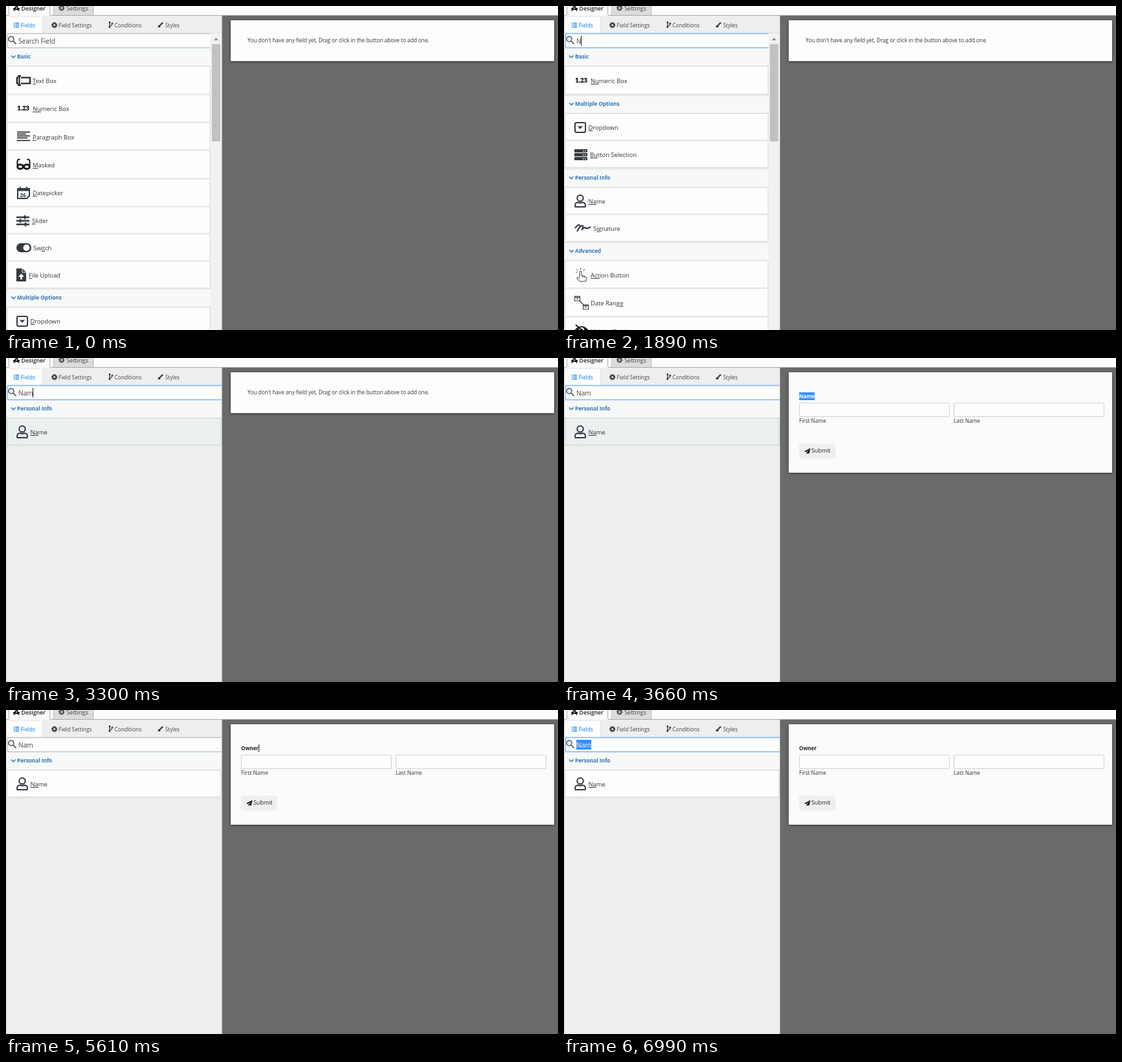
Animation of 850x500 px, one loop 8000 ms. Source, as an HTML page:

```html
<!DOCTYPE html>
<html lang="en">
<head>
<meta charset="utf-8">
<title>Form designer</title>
<style>
  html, body { margin: 0; width: 100%; height: 100%; overflow: hidden; background: #6a6a6a; }
  svg { display: block; width: 850px; height: 500px; }
  text { font-family: "Open Sans", "Noto Sans", sans-serif; white-space: pre; }
  .u { text-decoration: underline; }
  .line { fill: none; stroke: #343a40; stroke-width: 2; }
  .ink { fill: none; stroke: #111; stroke-width: 2; }
  .card { filter: drop-shadow(0 1px 2px rgba(0, 0, 0, .5)); }
</style>
</head>
<body>
<svg id="stage" viewBox="0 0 850 500"></svg>
<script>
const LOOP = 8000;
const WHITE = '#fdfdfd', BLUE = '#2f74b5', DARK = '#343a40';

const rect = (x, y, w, h, fill, more = '') =>
  `<rect x="${x}" y="${y}" width="${w}" height="${h}" fill="${fill}" ${more}/>`;
const path = (d, more = 'class="line"') => `<path d="${d}" ${more}/>`;
const circle = (x, y, r, more) => `<circle cx="${x}" cy="${y}" r="${r}" ${more}/>`;
// Letters between underscores are underlined.
const text = (x, y, size, fill, str, more = '') =>
  `<text x="${x}" y="${y}" font-size="${size}" fill="${fill}" ${more}>` +
  str.replace(/_(.+?)_/g, '<tspan class="u">$1</tspan>') + '</text>';
const group = (id, body, more = '') => `<g id="${id}" ${more}>${body}</g>`;
const gear = (x, y, color) =>
  circle(x, y, 2.6, `fill="none" stroke="${color}" stroke-width="2.2"`) +
  circle(x, y, 4, `fill="none" stroke="${color}" stroke-width="1.5" stroke-dasharray="1.7 1.44"`);

// Icons are drawn from the left edge of the icon and the label's baseline.
const icons = {
  textBox: path('M4.5-11V3M2-11h5M2 3h5M3-8.5H1v9h2M7-8.5h14v9H7', 'class="ink"'),
  number: text(1.5, -1, 9.3, '#111', '1.23',
    'font-weight="800" stroke="#111" stroke-width=".4" style="font-family:\'Noto Serif\',serif"'),
  paragraph: path('M1-11.5h20M1-8.5h14M1-5.5h20M1-2.5h16M1 1.5h20', 'class="ink" style="stroke-width:1.5"'),
  mask: path('M1.5-3V-9q0-4 4-3M20.500-3V-9q0-4-4-3M9-3h4', 'class="ink"') +
    [6, 16].map(x => `<ellipse cx="${x}" cy="-1" rx="4.3" ry="3.3" class="ink" style="stroke-width:2.8"/>`).join(''),
  calendar: path('M2-10h18V1l-4 4H2z') + rect(1, -11, 20, 4.500, DARK) + path('M6-13v3M16-13v3') +
    text(5.500, 3, 8, DARK, '26', 'font-weight="700"'),
  slider: path('M0-9h20M0-3.500h20M0 2h20M13-12v6M6-6.500v6M14-1v6', 'class="line" style="stroke-width:2.4"'),
  toggle: rect(0, -11, 23, 14, DARK, 'rx="7"') + circle(15.500, -4, 5, `fill="${WHITE}"`),
  upload: path('M0-14h9l6 6V6H0z', `fill="${DARK}"`) +
    path('M9-14v6h6', `fill="none" stroke="${WHITE}"`) +
    path('M7.500-6l4.500 5h-3v4h-3v-4h-3z', `fill="${WHITE}"`),
  dropdown: rect(1, -11, 16, 15, 'none', 'rx="2" class="line"') + path('M5-5.500h8l-4 4.500z', `fill="${DARK}"`),
  bars: [-12, -6, 0].map(y => rect(0, y, 20, 5, DARK, 'rx="1"') +
    rect(13, y + 2, 1.500, 1.500, WHITE) + rect(16, y + 2, 1.500, 1.500, WHITE)).join(''),
  person: circle(9, -8.500, 4.700, 'class="line"') +
    path('M1 4V3q0-5 5-5q3 1.500 6 0q5 0 5 5v1q0 1-1 1H2q-1 0-1-1z'),
  scribble: path('M1-4Q5-10 8-9Q10-7 4 1Q9-9 13-8Q14-6 11-1Q15-6 17-5Q17-2 25-6'),
  hand: path('M8 0V-8q0-2 1.500-2t1.500 2v5l6 1.500q2 .5 1.500 3l-1 4.500H9L4 2Q4-1 6 0l2 2' +
    'M13-3v3M16-2v2M9.500-12v-3M5-11l-2-2M14-11l2-2M4-8H2', 'class="line" style="stroke-width:1"'),
  range: [[.5, -14], [13.500, -1]].map(([x, y]) => rect(x, y, 8, 7, 'none', 'class="line" style="stroke-width:1"') +
    path(`M${x} ${y + 1.500}h8M${x + 3} ${y + 4}h2`, 'class="line" style="stroke-width:1.500"')).join('') +
    path('M8-7L14-1', 'class="line" style="stroke-width:1.2"'),
  hidden: path('M0-6Q11-18 22-6Q11 6 0-6z', 'fill="#222"') + circle(11, -6, 4, `fill="${WHITE}"`) +
    circle(11, -6, 2, 'fill="#222"') + path('M2-14L20 2', 'class="ink"')
};

// [label, icon, label x, row height]
const fields = {
  textBox: ['_T_ext Box', 'textBox', 41, 43.5],
  numeric: ['_Nu_meric Box', 'number', 41, 43.5],
  paragraph: ['_P_aragraph Box', 'paragraph', 41, 43],
  masked: ['_M_asked', 'mask', 41, 43.5],
  date: ['_D_atepicker', 'calendar', 41, 43],
  slider: ['_S_lider', 'slider', 40, 42],
  toggle: ['Sw_it_ch', 'toggle', 42, 42],
  upload: ['_F_ile Upload', 'upload', 35, 42],
  dropdown: ['_D_ropdown', 'dropdown', 37.5, 42],
  buttons: ['_Bu_tton Selection', 'bars', 40, 42],
  name: ['_Na_me', 'person', 37.5, 42],
  signature: ['S_i_gnature', 'scribble', 45, 42],
  action: ['_Act_ion Button', 'hand', 41, 43],
  range: ['Date Rang_e_', 'range', 41, 44],
  hidden: ['_Hi_dden Field', 'hidden', 41, 43]
};

function header(y, title, width, id = '') {
  return rect(1, y, width, 26, '#f7f8f8') +
    path(`M1 ${y + 26}.5h${width}`, 'stroke="#d9dcde"') +
    path(`M8 ${y + 10.5}l3.300 3.300l3.300-3.300`, `fill="none" stroke="${BLUE}" stroke-width="1.500"`) +
    text(17, y + 15, 8.2, BLUE, title, `font-weight="700" ${id}`);
}

function row(y, [label, icon, x, height], width, id = '') {
  const top = Math.round(y), base = Math.round(y + height / 2 + 4);
  const h = Math.round(y + height) - top - 1;
  return rect(2.5, top + .5, width - 3, h - 1, WHITE, `stroke="#eceeef" ${id}`) +
    `<g transform="translate(16 ${base})">${icons[icon]}</g>` +
    text(x, base, 9.4, '#333', label);
}

function list(sections, width, named = false) {
  let y = 66, out = '';
  for (const [title, keys] of sections) {
    const height = 27 + keys.reduce((sum, k) => sum + fields[k][3], 0);
    out += rect(1, Math.round(y), width, Math.round(height + 1), '#e2e3e4');
    out += header(Math.round(y), title, width, named ? 'id="heading"' : '');
    y += 27;
    for (const key of keys) {
      out += row(y, fields[key], width, named ? 'id="nameRow"' : '');
      y += fields[key][3];
    }
    y += 2.5;
  }
  return out;
}

const lists = {
  all: list([['Basic', ['textBox', 'numeric', 'paragraph', 'masked', 'date', 'slider', 'toggle', 'upload']],
    ['Multiple Options', ['dropdown']]], 314),
  n: list([['Basic', ['numeric']], ['Multiple Options', ['dropdown', 'buttons']],
    ['Personal Info', ['name', 'signature']], ['Advanced', ['action', 'range', 'hidden']]], 314),
  na: list([['Personal Info', ['name', 'signature']]], 331),
  nam: list([['Personal Info', ['name']]], 331, true)
};

const topBar = rect(0, 0, 850, 14, WHITE) + rect(0, 14, 850, 1, '#a9a9a9') +
  rect(73, 0, 62, 14, '#dcdcdc') + path('M73.5 0V14M134.5 0V14', 'stroke="#bbb"') +
  rect(4, 0, 64, 15, WHITE) + path('M4.5 0V14M67.5 0V14', 'stroke="#aaa"') +
  path('M15.500 0L12 7.500M16.500 0L20 7.500M11 3.500q5 3 10 0', 'class="ink" style="stroke-width:1.800"') +
  text(23.5, 7, 8.75, '#222', 'Designer', 'font-weight="600"') +
  gear(85.5, 3, '#555') + text(93, 7, 9.15, '#444', 'Settings');

const tabs = rect(0, 15, 333, 485, '#eee') + rect(0, 15, 1, 485, '#d2d6da') +
  rect(1, 17, 55, 25, WHITE) + path('M56.5 17V42', 'stroke="#ddd"') +
  path('M12 26.500h1.600M12 29.500h1.600M12 32.500h1.600M14.500 26.500h5.500M14.500 29.500h5.500M14.500 32.500h5.500',
    'stroke="#0d7ff5" stroke-width="1.400"') +
  text(22.5, 33, 8.3, '#0d7ff5', 'Fields') +
  gear(74.5, 29.5, '#444') + text(81, 33, 8.3, '#444', 'Field Settings') +
  path('M159.500 26V33M163.500 27.500q0 3-4 3', 'fill="none" stroke="#333" stroke-width="1.200"') +
  [[159.5, 25.5], [159.5, 32.5], [163.5, 27]].map(([x, y]) => circle(x, y, 1.4, 'fill="#333"')).join('') +
  text(167, 33, 8.3, '#444', 'Conditions') +
  path('M241.500 25.500L237.500 29.500', 'stroke="#333" stroke-width="2.200"') +
  circle(236, 31.3, 2, 'fill="#333"') + text(245, 33, 8.3, '#444', 'Styles');

const scrollbar = rect(315, 42, 17, 458, '#f1f1f1') + rect(317, 59, 13, 150, '#c1c1c1') +
  path('M320 53l3.500-4l3.500 4z', 'fill="#8b8b8b"');

const search = rect(1, 42, 331, 24, WHITE) +
  path('M332 42.500H2.500V64.500H332', 'id="border" fill="none" stroke-width="1.300"') +
  circle(8, 51, 4, 'fill="none" stroke="#777" stroke-width="2"') +
  path('M11 54l4 4', 'stroke="#777" stroke-width="2.300" stroke-linecap="round"') +
  rect(19, 46, 23, 15, '#3390ff', 'id="searchMark"') +
  text(19, 58, 10.15, '#444', '', 'id="query"') +
  rect(0, 46, 1, 15, '#222', 'id="searchCaret"');

const emptyForm = rect(346, 22, 498, 63, WHITE, 'class="card"') +
  text(372, 56, 8.24, '#333', 'You don\'t have any field yet, Drag or click in the button above to add one.');

const input = (x, label) =>
  rect(x + .5, 69.5, 231, 21, WHITE, 'rx="1.500" stroke="#ccd3d8"') + text(x, 100, 8.2, '#333', label);
const nameForm = rect(346, 22, 498, 155, '#fbfbfb', 'class="card"') +
  rect(362, 53, 24, 12, '#3390ff', 'id="labelMark"') +
  text(362, 62, 8.05, '#222', '', 'id="label" font-weight="700"') +
  rect(0, 53, 1, 12, '#222', 'id="labelCaret"') +
  input(362, 'First Name') + input(600, 'Last Name') +
  rect(362, 132, 56, 23, '#efefef', 'rx="3"') +
  path('M379.500 139L370 144l2.500 1.200l5-4l-4 4.800v2.500l1.800-1.700l2.200 1z', 'fill="#111"') +
  text(381, 146, 8.9, '#222', 'Submit');

const stage = document.getElementById('stage');
stage.innerHTML = rect(0, 0, 850, 500, '#6a6a6a') + topBar + tabs +
  Object.entries(lists).map(([key, body]) => group('list-' + key, body)).join('') +
  search + group('scrollbar', scrollbar) + rect(332, 15, 1, 485, '#b5b5b5') +
  group('emptyForm', emptyForm) + group('nameForm', nameForm);

const el = id => document.getElementById(id);
const show = (id, on) => { el(id).style.display = on ? '' : 'none'; };
const within = (t, ...spans) => spans.some(([a, b]) => t >= a && t < b);
const ramp = (t, start, length) => Math.min(1, Math.max(0, (t - start) / length));
const stepAt = (steps, t) => steps.filter(([start]) => t >= start).pop()[1];

const queries = [[0, 'Search Field'], [1800, 'N'], [2040, 'Na'], [2250, 'Nam']];
const filters = [[0, 'all'], [1860, 'n'], [2100, 'na'], [2280, 'nam']];
const labels = [[0, 'Name'], [5010, 'O'], [5250, 'Ow'], [5340, 'Own'], [5430, 'Owne'], [5610, 'Owner']];

const mix = (from, to, k) => `rgb(${from.map((v, i) => Math.round(v + (to[i] - v) * k))})`;

function setText(id, value) {
  const node = el(id);
  if (node.textContent !== value) node.textContent = value;
  return node;
}

function render(t) {
  const filter = stepAt(filters, t);
  for (const key in lists) show('list-' + key, key === filter);
  show('scrollbar', filter === 'all' || filter === 'n');

  const focus = ramp(t, 750, 120) - ramp(t, 3640, 120) + ramp(t, 6780, 120);
  el('border').setAttribute('stroke', mix([184, 195, 206], [116, 180, 245], focus));

  const selected = t >= 6990;
  const query = setText('query', stepAt(queries, t));
  query.setAttribute('fill', selected ? '#fff' : '#444');
  show('searchMark', selected);
  const typed = t >= 1800;
  el('searchCaret').setAttribute('x', typed ? Math.floor(19 + query.getComputedTextLength()) : 19);
  show('searchCaret', within(t, [780, 1290], [1800, 2790], [3300, 3660], [6810, 6990]));

  const hover = within(t, [2280, 4050]);
  el('nameRow').setAttribute('fill', hover ? '#ebf0f1' : WHITE);
  el('nameRow').setAttribute('stroke', hover ? '#dde4e7' : '#eceeef');
  const over = within(t, [6240, 6720]);
  el('heading').setAttribute('fill', over ? '#23527c' : BLUE);
  el('heading').style.textDecoration = over ? 'underline' : 'none';

  const added = t >= 3660;
  show('emptyForm', !added);
  show('nameForm', added);
  const marked = t < 5010;
  const label = setText('label', stepAt(labels, t));
  label.setAttribute('fill', marked ? '#fff' : '#222');
  show('labelMark', marked);
  if (added) el('labelCaret').setAttribute('x', Math.floor(362 + label.getComputedTextLength()));
  show('labelCaret', within(t, [5010, 6120], [6630, 6810]));
}

const began = performance.now();
function frame() {
  render((performance.now() - began) % LOOP);
  requestAnimationFrame(frame);
}
frame();
</script>
</body>
</html>
```
